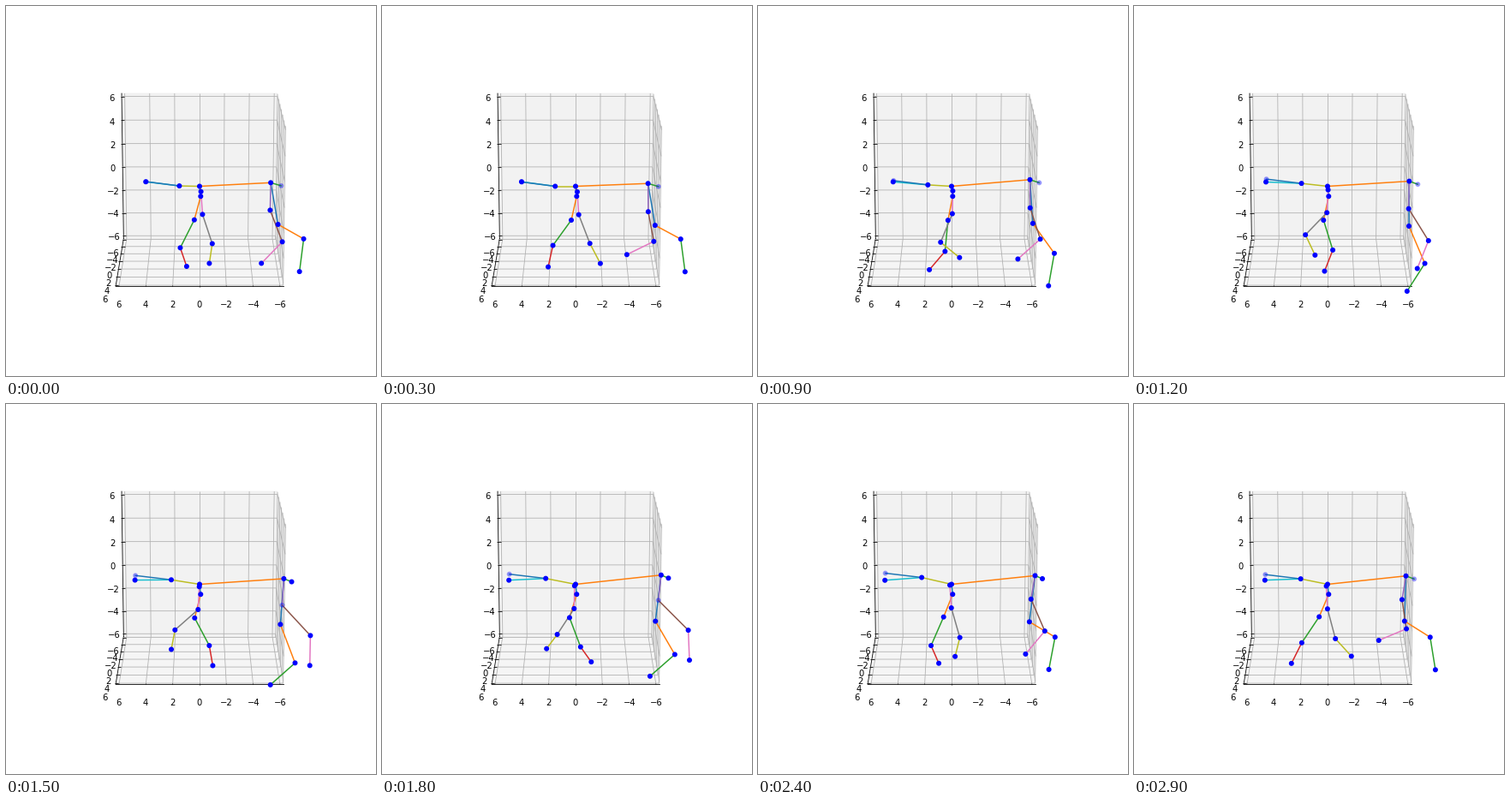
Recreate the animation shown at these times as a matplotlib script. Size 432x432 px, loop 3000 ms.

```python
import numpy as np
import matplotlib.pyplot as plt
from matplotlib.animation import FuncAnimation
from matplotlib.collections import LineCollection
from matplotlib.colors import to_rgba

SIZE, FRAMES = 432, 30
STRIDE, SWAY = 24.5, 40      # frames per step cycle and per slow body sway
WIDTH, HEIGHT, MARGIN = 0.775 * SIZE, 0.755 * SIZE, 0.125 * SIZE
ELEV = np.radians(15)
EDGE = 6.25                  # half-width of the box
GAP = 11.5 * 48 / (WIDTH + HEIGHT)   # distance of the tick labels
TICKS = range(-6, 7, 2)

fig = plt.figure(figsize=(6, 6), dpi=72, facecolor="white")
ax = fig.add_axes([0, 0, 1, 1])
ax.axis("off")


def project(points):
    """Perspective view along the y axis, from box units to pixels."""
    x, y, z = np.asarray(points, float).T / 12
    depth = 10 - y * np.cos(ELEV) - z * np.sin(ELEV)
    up = z * np.cos(ELEV) - y * np.sin(ELEV)
    return np.column_stack([
        MARGIN + WIDTH * (0.095 - x / depth) / 0.185,
        SIZE - MARGIN - HEIGHT * (0.095 + up / depth) / 0.185])


def pane(points, grey):
    ax.add_patch(plt.Polygon(project(points), closed=False, lw=1, alpha=0.5,
                             facecolor=str(grey), edgecolor=str(grey), zorder=0))


def line(points, zorder, cap="projecting"):
    ax.plot(*project(points).T, color="black", lw=0.8, zorder=zorder,
            solid_capstyle=cap)


def axis(order, spine, grid, tick, label):
    """Each callable maps a tick value to points in the box."""
    line([spine(-EDGE), spine(EDGE)], order + 0.1)
    ax.add_collection(LineCollection([project(grid(v)) for v in TICKS],
                                     colors="#b0b0b0", linewidths=0.8,
                                     zorder=order + 0.2), autolim=False)
    for v in TICKS:
        line(tick(v), order + 0.3, "butt")
        x, y = project([label(v)])[0]
        ax.text(x, y, str(v).replace("-", "\u2212"), fontsize=10,
                ha="center", va="top", zorder=order + 0.4)


def draw_box():
    e, far = EDGE, EDGE + GAP
    out, inn = e + 0.1, e - 0.2
    pane([(-e, -e, -e), (-e, e, -e), (-e, e, e), (-e, -e, e)], 0.95)
    pane([(-e, -e, -e), (e, -e, -e), (e, -e, e), (-e, -e, e)], 0.9)
    pane([(-e, -e, -e), (e, -e, -e), (e, e, -e), (-e, e, -e)], 0.925)
    axis(1, lambda v: (v, e, -e),
         lambda v: [(v, -e, e), (v, -e, -e), (v, e, -e)],
         lambda v: [(v, out, -e), (v, inn, -e)],
         lambda v: (v, far, -far))
    axis(2, lambda v: (e, v, -e),
         lambda v: [(e, v, -e), (-e, v, -e), (-e, v, e)],
         lambda v: [(out, v, -e), (inn, v, -e)],
         lambda v: (far, v, -far))
    axis(3, lambda v: (e, -e, v),
         lambda v: [(e, -e, v), (-e, -e, v), (-e, e, v)],
         lambda v: [(out, -e, v), (inn, -e, v)],
         lambda v: (far, -far, v))


def cycle(peak, period=STRIDE):
    """Cosine over all frames that is highest at the frame `peak`."""
    return np.cos(2 * np.pi * (np.arange(FRAMES) - peak) / period)


def path(x, y):
    return np.column_stack(np.broadcast_arrays(x, y, np.zeros(FRAMES))[:2])


def swing(start, length, mid, amp, peak, stretch=0, period=STRIDE):
    """End of a bone swinging about `mid` degrees from straight down."""
    beat = cycle(peak, period)
    angle = np.radians(mid + amp * beat)
    reach = length * (1 + stretch * beat)
    return start + path(reach * np.sin(angle), reach * np.cos(angle))


def make_joints():
    j = {}
    drift = cycle(1, SWAY)

    # Body: slow sway, with a bob twice per stride at the girdle.
    neck = path(196.5 + 6 * drift, 206.5 + 4 * cycle(3, SWAY))
    j["tip_far"] = neck + path(2 * drift - 40.7, -5)
    j["tip_near"] = neck + path(2 * drift - 41.2, 4.3 * cycle(23, SWAY) - 1)
    j["neck"] = neck
    j["root"] = path(226, 210.5)
    girdle = path(317.5 + 8.5 * cycle(19, SWAY),
                  202.5 + 3 * cycle(4, SWAY) + 2.2 * cycle(14, STRIDE / 2))
    j["end"] = girdle + path(10.3 + 2 * drift, 3.6)
    j["girdle"] = girdle

    # Legs a and b hang from the root, c and d from the girdle.
    j["a0"] = path(227.3, 222.2)
    j["a1"] = swing(j["a0"], 28.5, -17, 6, 8, period=SWAY)
    j["a2"] = swing(j["a1"], 36.5, -4, 32, 15.3)
    j["a3"] = swing(j["a2"], 24.6, 0, 42, 20.2, -0.15)

    j["b0"] = path(226 + 2 * cycle(4, SWAY), 214.2 + 2.8 * cycle(3, SWAY))
    j["b1"] = swing(j["b0"], 26.7, 0.4, 3.7, 1.2)
    j["b2"] = swing(j["b1"], 36, -13.4, 36, 1.9)
    j["b3"] = swing(j["b2"], 24.6, 7, 48, 7.4, 0.17)

    j["c1"] = swing(girdle, 30.5, -4.5, 5.5, 6, 0.09, SWAY)
    j["c2"] = swing(j["c1"], 42, 27, 18.5, 17.1, 0.18)
    j["c3"] = swing(j["c2"], 35, -32, 35.4, 17)

    j["d1"] = swing(girdle, 52, 1, 9, 1, -0.05, SWAY)
    j["d2"] = swing(j["d1"], 41, 41.5, 21.3, 1.8, -0.18)
    j["d3"] = swing(j["d2"], 38.5, -20.8, 30, 4.3)
    return j


# Chains of joints with the colour cycle index of each bone.
CHAINS = [
    ("root a0 a1 a2 a3", (0, 1, 2, 3)),
    ("root b0 b1 b2 b3", (5, 6, 7, 8)),
    ("girdle d1 d2 d3", (0, 1, 2)),
    ("girdle c1 c2 c3", (4, 5, 6)),
    ("root neck tip_near", (8, 9)),
    ("neck tip_far", (0,)),
    ("root girdle end", (1, 2)),
]

joints = make_joints()
# Frames in which a joint lies behind its neighbours and looks paler.
behind = {
    "tip_far": np.full(FRAMES, True),
    "end": cycle(20, SWAY) < 0.4,
    "c1": cycle(17.5) > 0.5,
}

draw_box()
bones = []
for names, hues in CHAINS:
    chain = names.split()
    for start, stop, hue in zip(chain, chain[1:], hues):
        bone, = ax.plot([], [], color=f"C{hue}", lw=1.5, zorder=5)
        bones.append((bone, start, stop))
dots = ax.scatter([0] * len(joints), [0] * len(joints), s=20, linewidths=1.5,
                  color="blue", zorder=6)
ax.set_xlim(0, SIZE)
ax.set_ylim(SIZE, 0)


def dot_color(name, i):
    pale = name in behind and behind[name][i]
    return to_rgba("blue", 0.3 if pale else 1)


def draw(i):
    for bone, start, stop in bones:
        bone.set_data(*zip(joints[start][i], joints[stop][i]))
    dots.set_offsets([track[i] for track in joints.values()])
    dots.set_color([dot_color(name, i) for name in joints])
    return [bone for bone, *_ in bones] + [dots]


anim = FuncAnimation(fig, draw, frames=FRAMES, interval=100, repeat=True)
plt.show()
```
